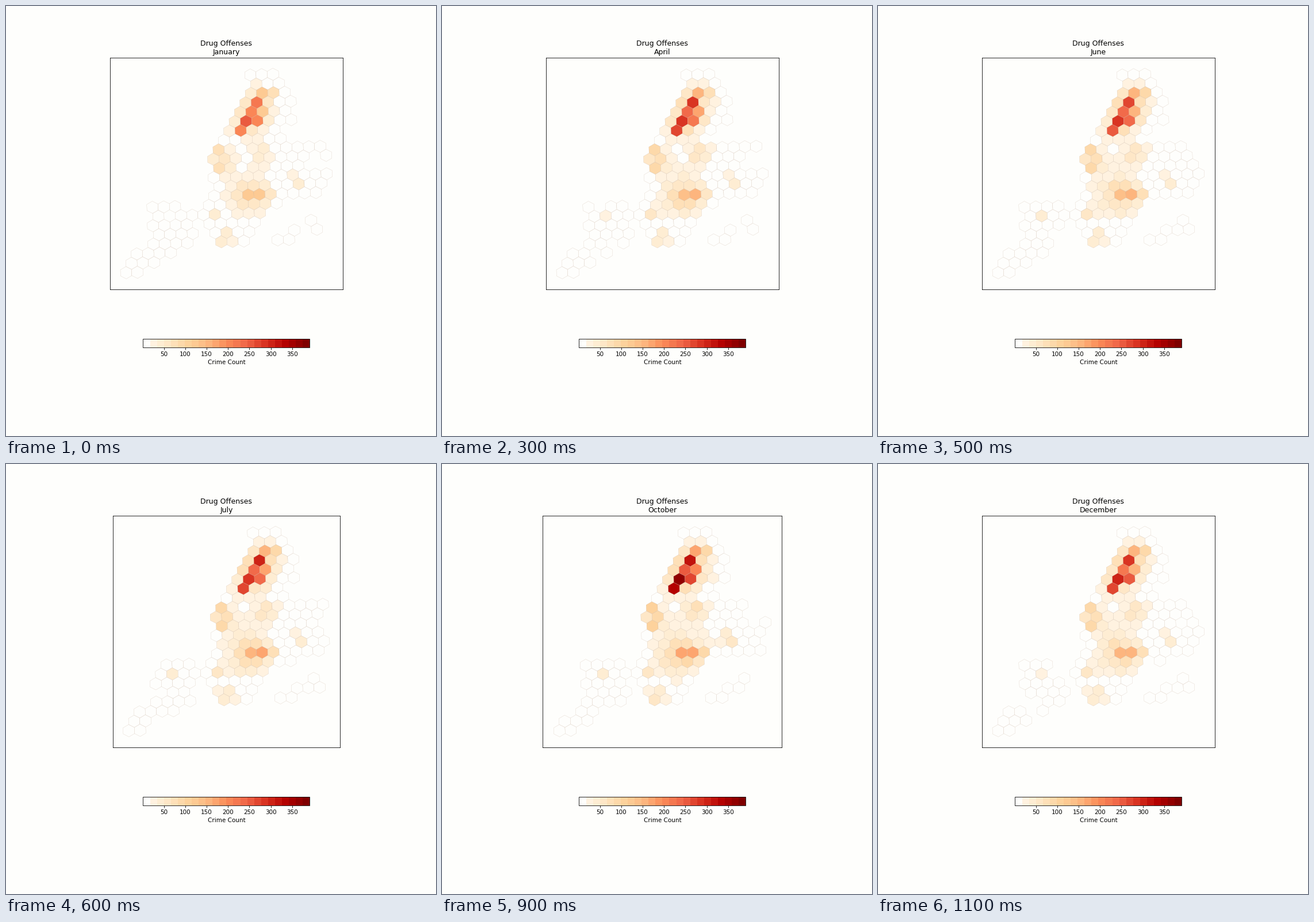
Write a matplotlib script that moves like this. It is 748x748 px and loops after 1.2 s.

```python
import numpy as np
import matplotlib.pyplot as plt
from matplotlib.animation import FuncAnimation
from matplotlib.cm import ScalarMappable
from matplotlib.collections import PolyCollection
from matplotlib.colors import ListedColormap, Normalize

PAPER = "#fefefc"
NAMES = ["January", "February", "March", "April", "May", "June", "July",
         "August", "September", "October", "November", "December"]

# Hex lattice: one step along a row, one step down a row
A = np.array([19.62, 0.67])
B = np.array([-9.35, -16.33])
RING = [A, A + B, B, -A, -A - B, -B]
HEX = np.array([(RING[k] + RING[(k + 1) % 6]) / 3 for k in range(6)])

# Land: west and east coasts as (row, column) points, and share of gaps
MAINLAND = ([(-4, -2), (-3, -1), (5, -1), (6, 0), (10, 1.4), (12, 2.2),
             (14, 4)],
            [(-4, 0), (-1, 2.6), (1, 4), (2, 3), (3, 2.4), (4, 7), (6, 7),
             (7, 9), (8, 10), (9, 10), (10, 6.4), (14, 6)], 0)
ARM = ([(10, -4), (12, -3), (13, -2), (14, -2), (15, -3), (17, -3)],
       [(10, -1), (11, 1), (12, 0), (13, 1), (14, 1), (17, -2)], 0.12)
ISLET = ([(12, 11), (14, 9)], [(12, 11), (13, 12), (14, 10)], 0.2)

# Broad districts: column, row, height, reach
DISTRICTS = [(0.2, -0.2, 68, 1.95), (-0.2, 5.1, 75, 1.1), (3.1, 4.5, 62, 1.1),
             (3.9, 9, 75, 2.1), (7.6, 7.6, 60, 0.7), (4.1, 13.6, 65, 0.8)]
# Single blocks on top of them: column, row, height
BLOCKS = [(0, -2, 105), (1, -2, 60), (0, -1, 211), (0, 0, 128), (1, 0, 75),
          (0, 1, 223), (1, 1, 167), (0, 2, 234), (-1, 4, 55), (0, 6, 40),
          (4, 9, 75), (5, 9, 90), (6, 9, 40), (2, 11, 50), (-2, 11, 35)]
HILLS = DISTRICTS + [(*block, 0.6) for block in BLOCKS]


def coast(points, r):
    return int(np.floor(np.interp(r, *zip(*points)) + 0.5))


def east_tip(m):
    """Easternmost cell: further south in summer, north in autumn."""
    return 10, 8 if m in (6, 7) else 6 if m in (8, 9, 10) else 7


def land(m, rng):
    """All (column, row) cells that report in month m."""
    tip = east_tip(m)
    cells = {tip, (-3, 17)}
    if m % 6 == 4:
        cells.add((-2, 18))
    for west, east, gaps in (MAINLAND, ARM, ISLET):
        for r in range(west[0][0], west[-1][0] + 1):
            for c in range(coast(west, r), coast(east, r) + 1):
                if rng.random() >= gaps:
                    cells.add((c, r))
    # Ragged east coast
    for r in range(3, 11):
        edge = coast(MAINLAND[1], r)
        for c in (edge + 1, edge + 2):
            inside = c * A[0] + r * B[0] < tip[0] * A[0] + tip[1] * B[0]
            if inside and rng.random() < 0.4:
                cells.add((c, r))
    return np.array(sorted(cells))


def crimes(cells, m, rng):
    """Sum of round hills, scaled by the season, with slight noise."""
    season = np.interp(m, [0, 2, 4, 10, 11], [0.82, 1, 0.93, 1.2, 1])
    total = np.zeros(len(cells))
    for c, r, height, reach in HILLS:
        dc, dr = cells[:, 0] - c, cells[:, 1] - r
        total += height * np.exp(-(dc**2 + dr**2 - dc * dr) / reach**2)
    noise = rng.uniform(0.93, 1.07, len(cells))
    return np.clip(season * total * noise, 1, 391)


def limits(v, margin=0.05):
    pad = margin * np.ptp(v)
    return v.min() - pad, v.max() + pad


fig, ax = plt.subplots(figsize=(10, 10), dpi=74.8, facecolor=PAPER)
ax.set(facecolor=PAPER, xticks=[], yticks=[], aspect="equal")
tones = plt.cm.OrRd(np.linspace(0, 1, 24))
shade = ScalarMappable(Normalize(1, 391), ListedColormap([PAPER, *tones[1:]]))
bar = fig.colorbar(shade, ax=ax, orientation="horizontal", shrink=0.5)
bar.set_label("Crime Count")
hexes = PolyCollection([], edgecolors="#c8b09c", linewidths=0.2)
ax.add_collection(hexes, autolim=False)


def draw(m):
    rng = np.random.default_rng(m)
    cells = land(m, rng)
    verts = (cells @ np.array([A, B]))[:, None] + HEX
    hexes.set_verts(verts)
    hexes.set_facecolor(shade.to_rgba(crimes(cells, m, rng)))
    ax.set_xlim(limits(verts[..., 0]))
    ax.set_ylim(limits(verts[..., 1]))
    ax.set_title(f"Drug Offenses\n{NAMES[m]}")
    return [hexes]


anim = FuncAnimation(fig, draw, frames=12, interval=100, repeat=True,
                     repeat_delay=0, init_func=lambda: draw(0))
plt.show()
```
